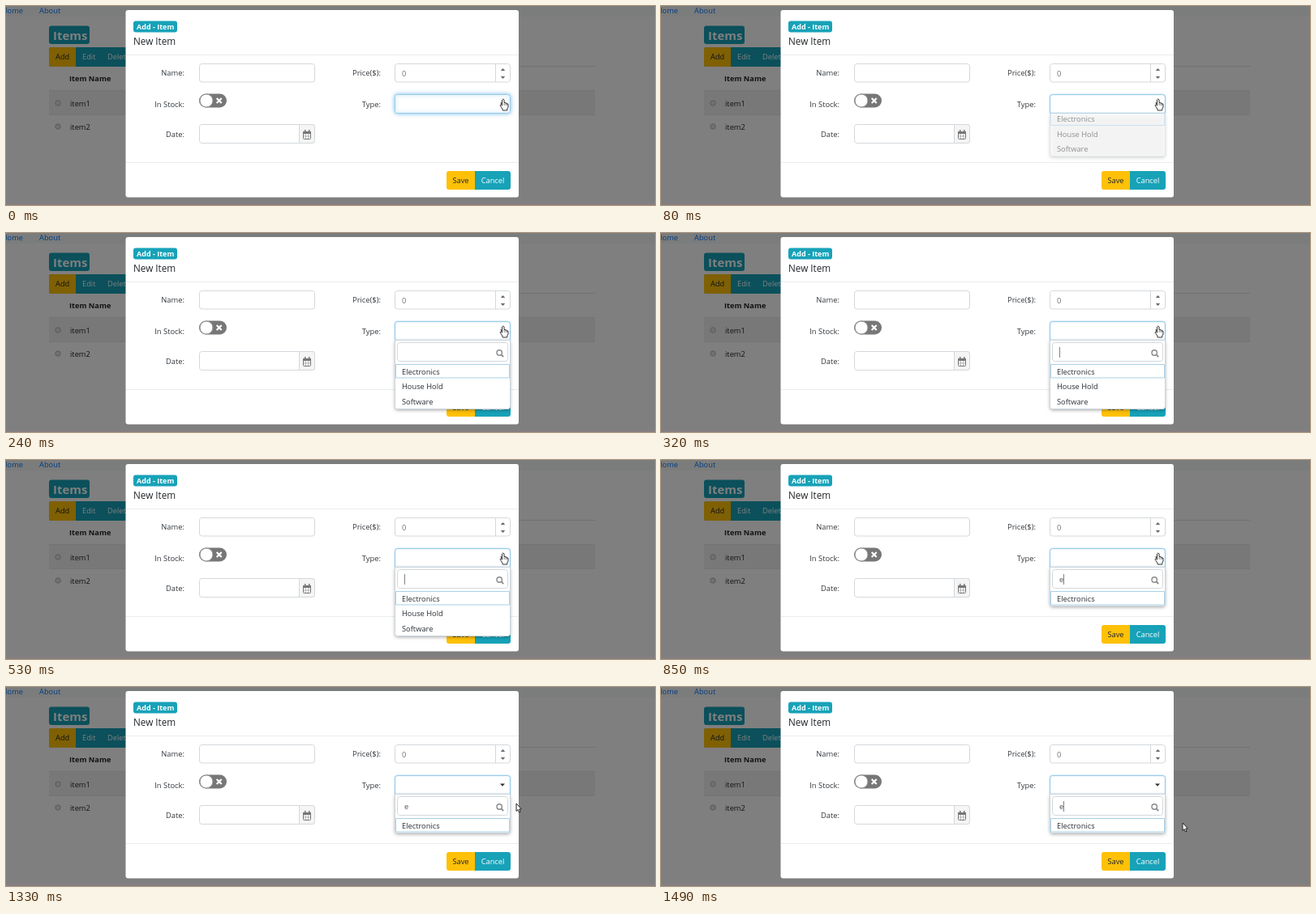
These frames come from a looping animation (800 by 246 pixels, 1560 ms). An HTML page with a canvas:

```html
<!DOCTYPE html>
<html lang="en">
<head>
<meta charset="utf-8">
<title>Add item dialog</title>
<style>
html, body { margin: 0; width: 100%; height: 100%; overflow: hidden; background: #7f7f7f; }
canvas { display: block; width: 800px; height: 246px; }
</style>
</head>
<body>
<canvas id="stage" width="800" height="246"></canvas>
<script>
const ctx = document.getElementById('stage').getContext('2d');
const LOOP = 1560;
const TEAL = '#17a2b8', AMBER = '#ffc107', LINK = '#007bff';
const INK = '#33383d', LINE = '#d3d8dc', RULE = '#e9ecef', FOCUS = '#9accea';

function rect(x, y, w, h, color) {
  ctx.fillStyle = color;
  ctx.fillRect(x, y, w, h);
}

function box(x, y, w, h, r, fill, stroke) {
  ctx.beginPath();
  ctx.roundRect(x, y, w, h, r);
  if (fill) { ctx.fillStyle = fill; ctx.fill(); }
  if (stroke) { ctx.strokeStyle = stroke; ctx.lineWidth = 1; ctx.stroke(); }
}

// y is the middle of the capital letters
function text(str, x, y, color = INK, size = 9.3, align = 'left', weight = 400) {
  ctx.font = `${weight} ${size}px "Open Sans", "Noto Sans", sans-serif`;
  ctx.textAlign = align;
  ctx.fillStyle = color;
  ctx.fillText(str, x, y + size * 0.36);
}

function poly(points, fill, stroke) {
  ctx.beginPath();
  points.forEach(([x, y]) => ctx.lineTo(x, y));
  ctx.closePath();
  if (fill) { ctx.fillStyle = fill; ctx.fill(); }
  if (stroke) { ctx.strokeStyle = stroke; ctx.lineWidth = 1; ctx.stroke(); }
}

function circle(x, y, r, fill, stroke, width = 1) {
  ctx.beginPath();
  ctx.arc(x, y, r, 0, Math.PI * 2);
  if (fill) { ctx.fillStyle = fill; ctx.fill(); }
  if (stroke) { ctx.strokeStyle = stroke; ctx.lineWidth = width; ctx.stroke(); }
}

function line(x1, y1, x2, y2, color, width = 1) {
  ctx.beginPath();
  ctx.moveTo(x1, y1);
  ctx.lineTo(x2, y2);
  ctx.strokeStyle = color;
  ctx.lineWidth = width;
  ctx.stroke();
}

const triangle = (x, y, w, h, color) => poly([[x - w, y], [x + w, y], [x, y + h]], color);

function glow(color, blur, dy, draw) {
  ctx.save();
  ctx.shadowColor = color;
  ctx.shadowBlur = blur;
  ctx.shadowOffsetY = dy;
  draw();
  ctx.restore();
}

function drawPage() {
  rect(0, 0, 800, 246, '#ffffff');
  rect(0, 0, 800, 13, '#f8f9fa');
  text('Home', 21, 6, LINK, 9.3, 'right');
  text('About', 41, 6, LINK);

  box(53, 24.5, 50, 22.5, 3, TEAL);
  text('Items', 58, 36.3, '#ffffff', 15, 'left', 700);
  box(53, 51, 110, 24, 3, TEAL);
  box(53, 51, 33, 24, [3, 0, 0, 3], AMBER);
  text('Add', 61, 63, '#212529');
  text('Edit', 94, 63, '#ffffff');
  text('Delete', 125, 63, '#ffffff');

  rect(163, 74, 563, 1, '#e3e6e9');
  text('Item Name', 78, 90, '#212529', 9.2, 'left', 700);
  rect(53, 104, 673, 30, '#f2f2f2');
  for (const y of [104, 134]) rect(53, y, 673, 1, '#e6e9ec');
  [120, 149].forEach((y, i) => {
    circle(64, y, 3.2, '#e4e4e4', '#b4b4b4');
    text('item' + (i + 1), 79, y + 0.4, '#212529');
  });

  rect(0, 0, 800, 246, 'rgba(0,0,0,.5)');
  rect(0, 243, 800, 3, '#857f82');
}

function drawToggle() {
  box(238, 108.5, 34, 17, 8.5, '#777777');
  circle(247, 117, 8, '#ffffff', '#8c8c8c');
  line(259.7, 114, 265.7, 120, '#ffffff', 2.2);
  line(265.7, 114, 259.7, 120, '#ffffff', 2.2);
}

function drawCalendar() {
  box(361.5, 146.5, 19, 23, [0, 3, 3, 0], '#f5f5f5', LINE);
  box(366.5, 155.5, 9, 9, 1, '#ffffff', '#777777');
  rect(366, 155, 10, 3, '#777777');
  rect(368, 153, 1.5, 3, '#777777');
  rect(373, 153, 1.5, 3, '#777777');
  for (const x of [369.5, 372.5]) line(x, 158, x, 164, '#9a9a9a', 0.7);
  line(367, 161, 375, 161, '#9a9a9a', 0.7);
}

function drawDialog() {
  box(147.5, 5, 484.5, 231.5, 3, '#ffffff');
  box(157, 18.5, 54, 14, 3, TEAL);
  text('Add - Item', 161, 25.6, '#ffffff', 9, 'left', 700);
  text('New Item', 157, 43.5, '#212529', 11.7);
  rect(148, 60, 484, 1, RULE);
  rect(148, 193, 484, 1, RULE);

  [['Name:', 220, 83], ['In Stock:', 220, 121.4], ['Date:', 220, 158.5],
   ['Price($):', 462, 83], ['Type:', 462, 121.4]]
    .forEach(([label, x, y]) => text(label, x, y, INK, 9.4, 'right'));

  box(238.5, 71.5, 142, 22.5, 3, '#ffffff', LINE);
  box(479.5, 71.5, 142, 22.5, 3, '#ffffff', LINE);
  text('0', 488, 83.3, '#6a7075');
  line(603.5, 72, 603.5, 94, LINE);
  triangle(612.5, 80, 2.7, -3, '#666666');
  triangle(612.5, 87, 2.7, 3, '#666666');

  drawToggle();
  box(238.5, 146.5, 142, 23, 3, '#ffffff', LINE);
  drawCalendar();

  box(543, 204, 35, 23, [3, 0, 0, 3], AMBER);
  box(578, 204, 44, 23, [0, 3, 3, 0], TEAL);
  text('Save', 560.5, 215.8, '#212529', 9.3, 'center');
  text('Cancel', 600, 215.8, '#ffffff', 9.3, 'center');
}

function drawSelect(open) {
  glow(open ? 'rgba(80,165,225,.4)' : 'rgba(80,165,225,.75)', open ? 2 : 5, 0,
    () => box(479.5, 109.5, 142, 23, open ? [3, 3, 0, 0] : 3, '#ffffff', FOCUS));
  triangle(612, 119.5, 3, 3.2, '#333333');
}

function drawSearch(query, caret) {
  box(482.5, 135.5, 136, 23, 3, '#ffffff', LINE);
  text(query, 491, 147.5, '#495057');
  if (caret) {
    const x = query ? 496.5 : 491.5;
    line(x, 141, x, 154, '#7d8388');
  }
  circle(608.2, 148, 3.2, null, '#8a8a8a', 1.4);
  line(610.5, 150.4, 613.2, 153.2, '#8a8a8a', 1.8);
}

function drawPanel(search, query, caret) {
  const options = ['Electronics', 'House Hold', 'Software'].filter(o => o.toLowerCase().startsWith(query));
  const top = search ? 162 : 130.5;
  const bottom = top + 18.5 * options.length;
  glow('rgba(0,0,0,.35)', 4, 1.5,
    () => box(479.5, 132.5, 142, bottom - 132.5, [0, 0, 3, 3], '#ffffff'));
  box(479.5, 132.5, 142, bottom - 132.5, [0, 0, 3, 3], '#ffffff', '#cbd5dc');
  if (search) drawSearch(query, caret);
  const rowTop = Math.max(132.5, top + 0.5);
  box(480.5, rowTop, 140, top + 17 - rowTop, 0, null, '#a9d0e8');
  options.forEach((o, i) => text(o, 488, top + 9.6 + i * 18.3, '#2b3035'));
}

function drawHand(x, y) {
  ctx.save();
  ctx.translate(x, y);
  poly([[-2.5, -6], [-1.3, -7], [0, -6], [0, -2.5], [1.8, -2.6], [2.2, -1.8], [3.6, -1.8],
    [4, -.8], [5, -.6], [5, 3], [3.8, 5], [3.8, 7], [-1.8, 7], [-2.2, 5], [-4.8, 1.2],
    [-4.6, 0], [-3.4, 0], [-2.5, 1.2]], '#ffffff', '#333333');
  for (const k of [0, 1.9, 3.6]) line(k, -2, k, 1, '#444444', 0.6);
  ctx.restore();
}

function drawArrow(x, y) {
  ctx.save();
  ctx.translate(x, y);
  poly([[0, 0], [0, 9.5], [2, 7.6], [3.4, 11], [5, 10.3], [3.6, 7.1], [6.2, 6.8]], '#ffffff', '#222222');
  ctx.restore();
}

function drawPointer(t) {
  if (t < 1240) drawHand(614, 122);
  else if (t < 1320) drawHand(617, 126);
  else if (t < 1400) drawArrow(629, 144);
  else if (t < 1490) drawArrow(639, 162);
  else drawArrow(643, 168);
}

function draw(t) {
  const open = t >= 80;
  const query = t >= 850 ? 'e' : '';
  const caret = (t >= 320 && t < 1180) || t >= 1490;
  drawPage();
  drawDialog();
  drawSelect(open);
  if (open) {
    ctx.globalAlpha = t < 170 ? 0.5 : 1;
    drawPanel(t >= 240, query, caret);
    ctx.globalAlpha = 1;
  }
  drawPointer(t);
}

const start = performance.now();
function tick() {
  draw((performance.now() - start) % LOOP);
  requestAnimationFrame(tick);
}
tick();
</script>
</body>
</html>
```
